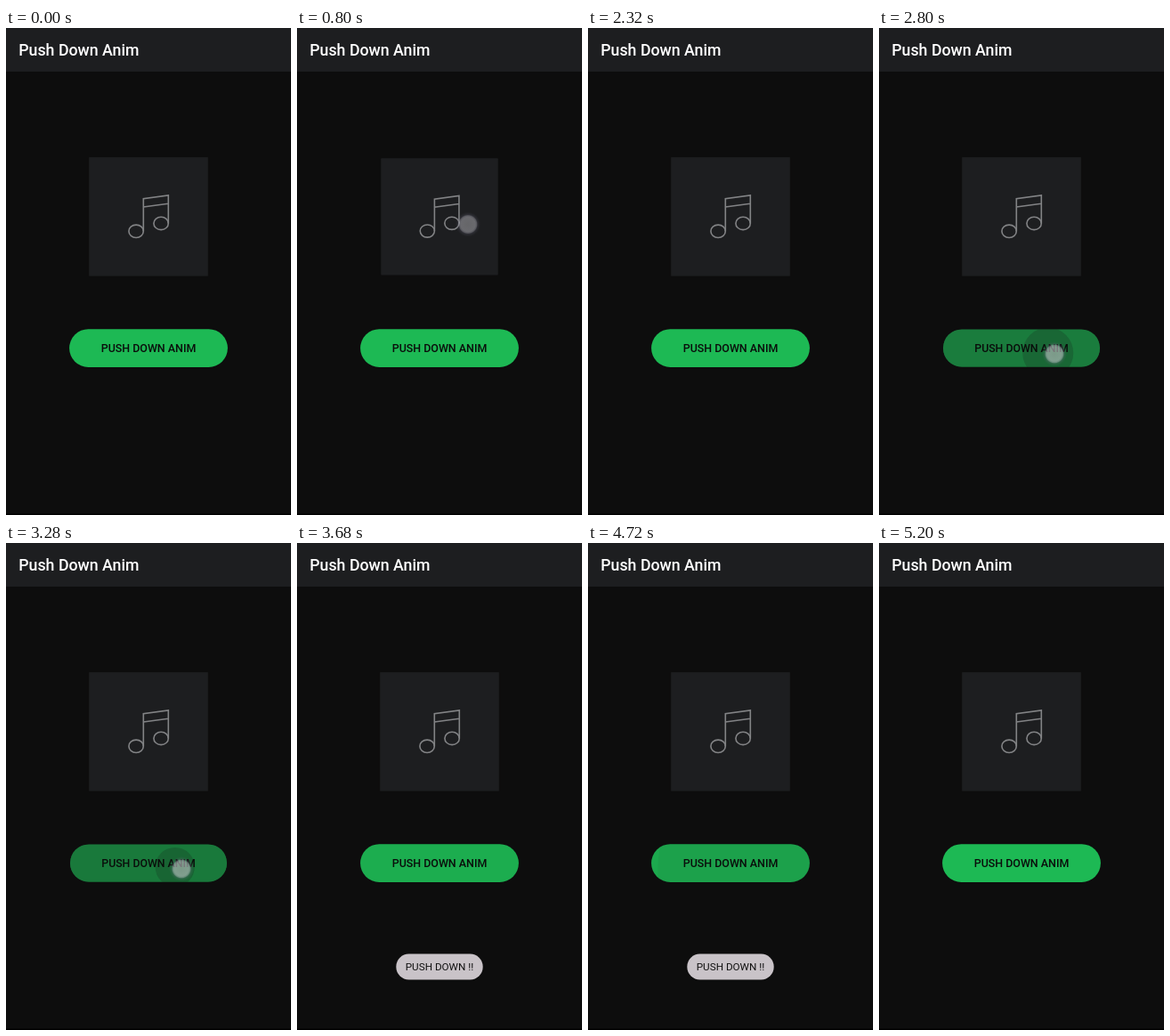
These frames come from a looping animation (320 by 547 pixels, 5280 ms). An HTML page:

```html
<!DOCTYPE html>
<html lang="en">
<head>
<meta charset="utf-8">
<title>Push Down Anim</title>
<style>
  html, body { margin: 0; width: 100%; height: 100%; overflow: hidden; background: #0d0d0d; }
  svg { display: block; width: 100%; height: 100%; }
  text { font-family: Roboto, sans-serif; font-weight: 500; }
  .icon { fill: none; stroke: #828385; stroke-width: 1.6; }
</style>
</head>
<body>
<svg viewBox="0 0 320 547">
  <defs>
    <clipPath id="pill"><rect x="71.1" y="338.2" width="177.8" height="42.7" rx="21.35"/></clipPath>
    <radialGradient id="glow">
      <stop offset="0" stop-color="#bdbcc0"/>
      <stop offset=".58" stop-color="#c6c5cc"/>
      <stop offset=".7" stop-color="#b4b3c0" stop-opacity=".85"/>
      <stop offset=".78" stop-color="#77758a" stop-opacity=".4"/>
      <stop offset="1" stop-color="#55536a" stop-opacity="0"/>
    </radialGradient>
  </defs>

  <rect width="320" height="547" fill="#0d0d0d"/>
  <rect y="545.5" width="320" height="1.5" fill="#000"/>
  <rect width="320" height="49" fill="#1d1e20"/>
  <text x="14.2" y="31" font-size="17.78" fill="#fff">Push Down Anim</text>

  <g id="card">
    <rect id="cardFace" x="93.2" y="145.2" width="133.6" height="133.4" fill="#1d1e20"/>
    <g class="icon">
      <ellipse cx="146.1" cy="228.3" rx="8.2" ry="7.2"/>
      <ellipse cx="174.1" cy="219.4" rx="8.2" ry="7.2"/>
      <path d="M154.3 228.3V191.8L182.3 188V219.4M154.3 201L182.3 197.2"/>
    </g>
  </g>

  <g id="button">
    <g clip-path="url(#pill)">
      <rect x="71" y="338" width="178" height="43" fill="#1db954"/>
      <rect id="shade" x="71" y="338" width="178" height="43" fill="#161418"/>
      <g id="ripples" fill="#161418"></g>
    </g>
    <text x="160" y="364.1" font-size="12.44" text-anchor="middle" fill="#0a0d0b">PUSH DOWN ANIM</text>
  </g>

  <g id="toast">
    <rect x="111.3" y="461.6" width="97.4" height="28.8" rx="14.4" fill="#c9c3c8"/>
    <text x="160" y="480.2" font-size="11.7" text-anchor="middle" fill="#111" style="font-weight:400">PUSH DOWN !!</text>
  </g>

  <circle id="touch" r="14" fill="url(#glow)"/>
</svg>
<script>
const LOOP = 5280, STEP = 80;
const PUSH = 50, RELEASE = 125, FADE = 440, TOUCH_FADE = 110;

const cardTaps = [[240, 740], [880, 1380], [1520, 2020]]
  .map(([down, up]) => ({ down, up, x: 192, y: 220.5, alpha: 1 }));
const buttonTaps = [
  { down: 2480, up: 2900, x: 197, y: 366, alpha: .6, rx: 190, ry: 365 },
  { down: 3060, up: 3290, x: 197, y: 366, alpha: .6, rx: 190, ry: 364 },
  { down: 3920, up: 4390, x: 200, y: 368, alpha: .6, rx: 189, ry: 366 }
];

const $ = id => document.getElementById(id);
const clamp = v => Math.min(1, Math.max(0, v));
const ramp = (t, from, length) => clamp((t - from) / length);
const ease = p => (1 - Math.cos(Math.PI * p)) / 2;
const set = (el, attrs) => {
  for (const name in attrs) el.setAttribute(name, attrs[name]);
};

for (const tap of buttonTaps) {
  tap.node = document.createElementNS("http://www.w3.org/2000/svg", "circle");
  set(tap.node, { cx: tap.rx, cy: tap.ry });
  $("ripples").append(tap.node);
}

// 1 while held, easing in on touch down and out on release
const pressure = (taps, t) => Math.max(...taps.map(({ down, up }) =>
  t < up ? ease(ramp(t, down - 20, PUSH)) : 1 - ease(ramp(t, up, RELEASE))));

function scaleAbout(id, cx, cy, scale) {
  set($(id), { transform: `translate(${cx} ${cy}) scale(${scale}) translate(${-cx} ${-cy})` });
}

function drawTouch(t) {
  const tap = [...cardTaps, ...buttonTaps].find(p => t >= p.down && t < p.up + TOUCH_FADE);
  set($("touch"), tap
    ? { cx: tap.x, cy: tap.y, opacity: tap.alpha * (1 - ramp(t, tap.up, TOUCH_FADE)) }
    : { opacity: 0 });
}

function drawRipples(t) {
  let shade = 0;
  for (const { down, up, node } of buttonTaps) {
    const exit = ramp(t, up, FADE);
    const strength = t < down ? 0 : ramp(t, down - 40, 120) * (1 - exit);
    shade = Math.max(shade, strength);
    set(node, {
      r: 8 + .065 * Math.max(0, t - down) + 90 * exit * exit,
      opacity: .2 * strength
    });
  }
  set($("shade"), { opacity: .37 * shade });
}

function draw(now) {
  const t = Math.floor((now % LOOP) / STEP) * STEP;
  const held = pressure(cardTaps, t);
  scaleAbout("card", 160, 211.9, 1 - .03 * held);
  set($("cardFace"), { rx: 2 * held });
  scaleAbout("button", 160, 359.5, 1 - .01 * pressure(buttonTaps, t));
  drawRipples(t);
  drawTouch(t);
  set($("toast"), { opacity: ramp(t, 3360, 160) * (1 - ramp(t, 5060, 140)) });
}

const start = performance.now();
function tick() {
  draw(performance.now() - start);
  requestAnimationFrame(tick);
}
tick();
</script>
</body>
</html>
```
